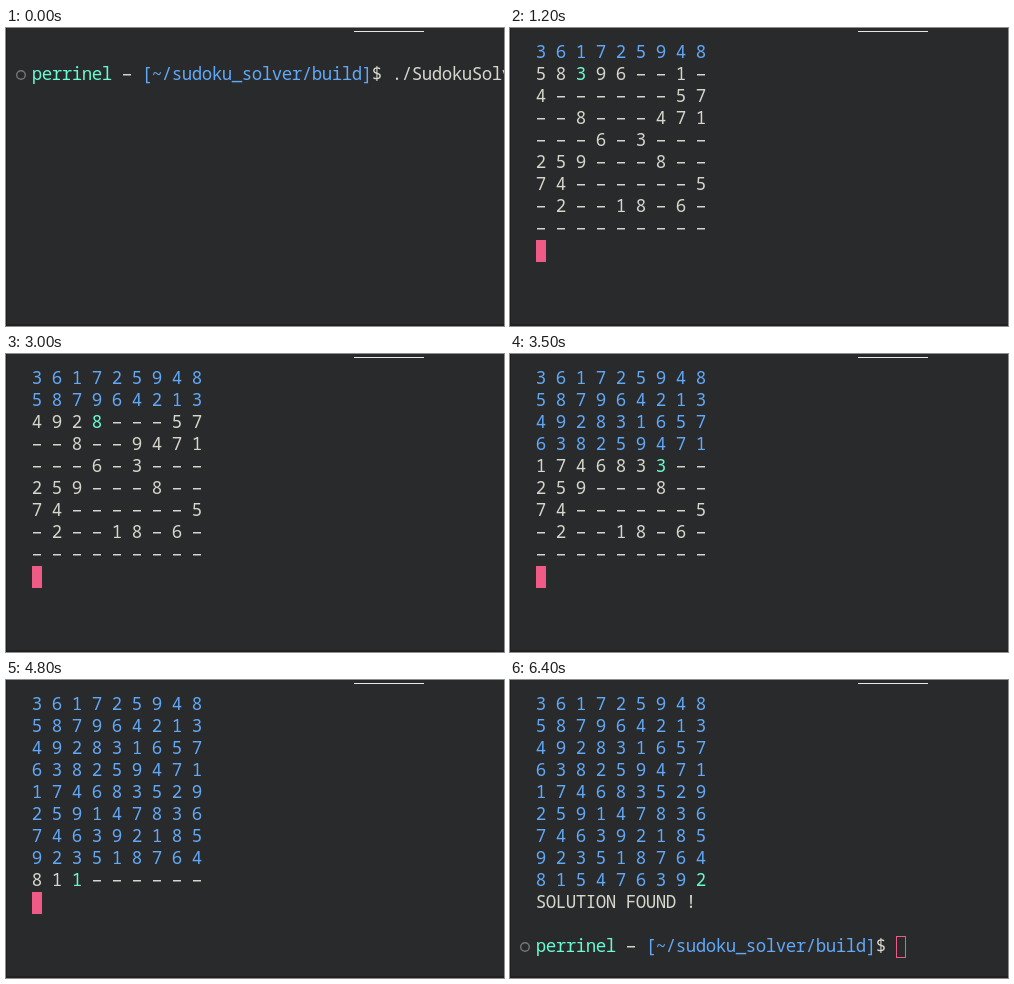
Animation, 498 px wide and 298 px high, one loop 6.7 s. Source, as an HTML page with a canvas:

```html
<!DOCTYPE html>
<html>
<head>
<meta charset="utf-8">
<title>Sudoku solver</title>
<style>
html, body { margin: 0; width: 100%; height: 100%; overflow: hidden; background: #292a2b; }
canvas { display: block; }
</style>
</head>
<body>
<canvas id="stage" width="498" height="298"></canvas>
<script>
const ctx = document.getElementById('stage').getContext('2d');
const BACK = '#292a2b', WHITE = '#d6d6cd', BLUE = '#61a8f7', GREEN = '#68fbd2', PINK = '#ef5b86';
const LOOP = 6700, START = 500, DONE = 5200, BLUR = 6400;
const CELL = 10, LINE = 22, LEFT = 26, TOP = 14;

const puzzle = '--1-25-4-' + '-8-96--1-' + '4------57' + '--8---471' + '---6-3---' +
  '259---8--' + '74------5' + '-2--18-6-' + '---------';
const grid = [...puzzle].map(c => +c || 0);
const steps = [];

function fits(i) {
  const r = Math.floor(i / 9), c = i % 9;
  return grid.every((v, j) => {
    const y = Math.floor(j / 9), x = j % 9;
    const sameBox = Math.floor(y / 3) === Math.floor(r / 3) && Math.floor(x / 3) === Math.floor(c / 3);
    return j === i || v !== grid[i] || !(y === r || x === c || sameBox);
  });
}

// Backtracking; a fitting 9 that leads nowhere stays in its cell.
function solve(i) {
  while (i < 81 && grid[i]) i++;
  if (i === 81) return true;
  for (let k = 1; k <= 9; k++) {
    grid[i] = k;
    steps.push({ cells: grid.slice(), at: i });
    if (!fits(i)) grid[i] = 0;
    else if (solve(i + 1)) return true;
  }
  return false;
}
solve(0);

function rect(x, y, w, h, color) {
  ctx.fillStyle = color;
  ctx.fillRect(x, y, w, h);
}

// One character per terminal cell; the dash is a wide bar.
function text(str, col, row, color) {
  const y = TOP + row * LINE;
  ctx.fillStyle = color;
  [...String(str)].forEach((ch, i) => {
    const x = LEFT + (col + i) * CELL;
    if (ch === '-') ctx.fillRect(x + 1, y + 10, CELL - 2, 1.5);
    else ctx.fillText(ch, x + CELL / 2, y + 16);
  });
}

function cursor(col, row, hollow) {
  const x = LEFT + col * CELL, y = TOP + row * LINE;
  rect(x, y, CELL, LINE, PINK);
  if (hollow) rect(x + 1, y + 1, CELL - 2, LINE - 2, BACK);
}

function prompt(row) {
  ctx.strokeStyle = '#75777a';
  ctx.lineWidth = 1.4;
  ctx.beginPath();
  ctx.arc(15, TOP + row * LINE + 11, 4.3, 0, 7);
  ctx.stroke();
  text('perrinel', 0, row, GREEN);
  text('-', 9, row, WHITE);
  text('[~/sudoku_solver/build]', 11, row, BLUE);
  text('$', 34, row, WHITE);
}

function board({ cells, at }, solved) {
  const current = Math.floor(at / 9);
  cells.forEach((v, i) => {
    const row = Math.floor(i / 9);
    const color = i === at ? GREEN : solved || row < current ? BLUE : WHITE;
    text(v || '-', i % 9 * 2, row, color);
  });
}

function draw(t) {
  rect(0, 0, 498, 298, BACK);
  rect(0, 0, 1, 298, '#1f2021');
  rect(0, 296, 498, 2, '#231f23');
  rect(348, 3, 70, 1, '#e6e6e6');
  ctx.font = '500 17.5px "Noto Sans Mono", monospace';
  ctx.textAlign = 'center';
  if (t < START) {
    prompt(1);
    text('./SudokuSolver', 36, 1, WHITE);
  } else if (t < DONE) {
    const n = 68 + Math.round((t - 1200) * 0.098);
    board(steps[Math.min(Math.max(n, 1), steps.length) - 1], false);
    cursor(0, 9, false);
  } else {
    board(steps[steps.length - 1], true);
    text('SOLUTION FOUND !', 0, 9, WHITE);
    prompt(11);
    cursor(36, 11, t >= BLUR);
  }
}

const begin = performance.now();
function tick() {
  const t = (performance.now() - begin) % LOOP;
  draw(Math.floor(t / 100) * 100);
  requestAnimationFrame(tick);
}
tick();
</script>
</body>
</html>
```
